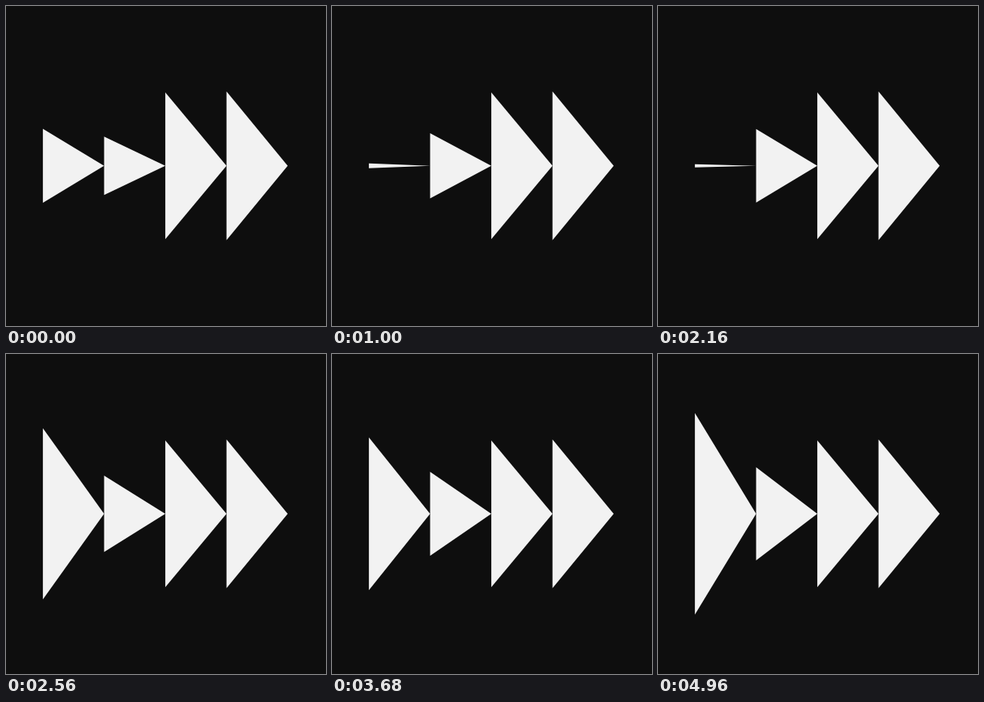
These frames come from a looping animation (400x400 px, 5000 ms). An HTML page:

```html
<!DOCTYPE html>
<html lang="en">
<head>
<meta charset="utf-8">
<title>Triangle clock</title>
<style>
  html, body { margin: 0; width: 100%; height: 100%; overflow: hidden; background: #0e0e0e; }
  svg { display: block; width: 100%; height: 100%; }
  path { fill: #f2f2f2; }
</style>
</head>
<body>
<svg viewBox="0 0 400 400">
  <path/><path/><path/><path/>
</svg>
<script>
  const LOOP = 5000, STEP = 40;
  const LEFT = 46.1, WIDTH = 76.5, MID = 199.75, MAX = 153;
  // The clock reads 14:36 and runs a little fast
  const HOUR = 14, MINUTE = 36, SECOND = 14.302, RATE = 1.718;
  const paths = document.querySelectorAll('path');

  function draw(now) {
    const t = Math.floor((now % LOOP) / STEP + 0.001) * STEP / 1000;
    const sec = SECOND + RATE * t;
    const parts = [sec % 1, sec / 60, MINUTE / 60, (HOUR + MINUTE / 60) / 24];
    parts.forEach((part, i) => {
      const half = MAX * part;
      const x = LEFT + i * WIDTH;
      paths[i].setAttribute('d', `M${x} ${MID - half}L${x + WIDTH} ${MID}L${x} ${MID + half}Z`);
    });
  }

  const begin = performance.now();
  function tick() {
    draw(performance.now() - begin);
    requestAnimationFrame(tick);
  }
  tick();
</script>
</body>
</html>
```
